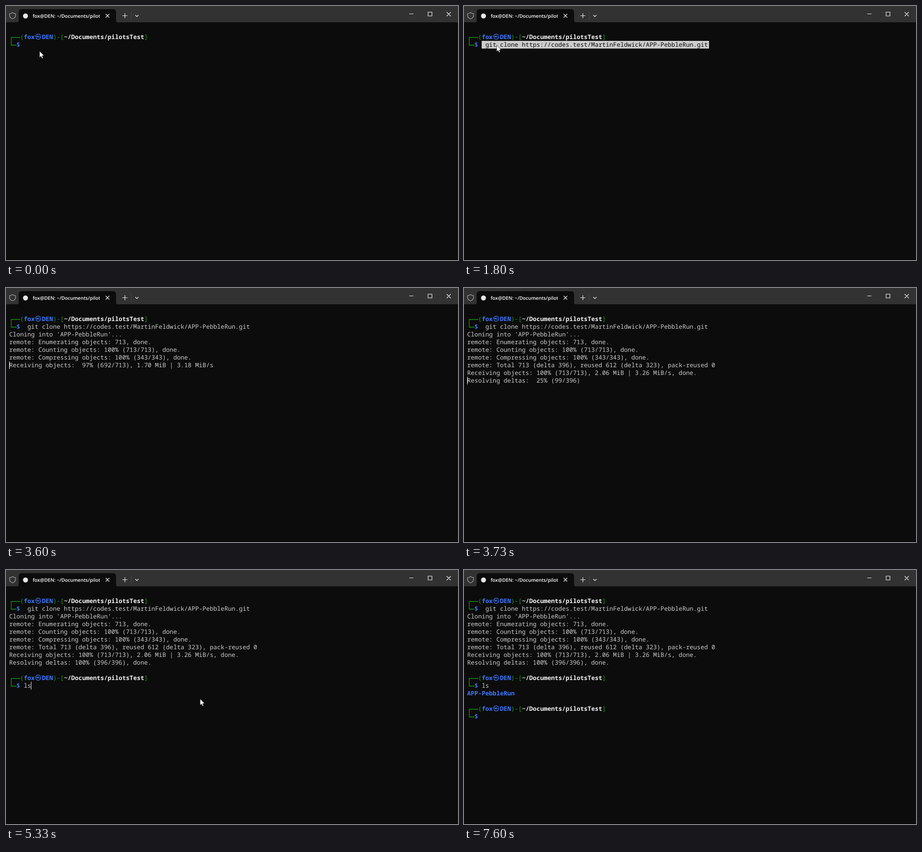
An HTML page for the animation above (7.74 s loop, 998 px wide and 561 px high).

```html
<!DOCTYPE html>
<html lang="en">
<head>
<meta charset="utf-8">
<title>Terminal</title>
<style>
  html, body { margin: 0; width: 100%; height: 100%; overflow: hidden; background: #0c0c0c; }
  svg { display: block; }
  text { white-space: pre; text-rendering: geometricPrecision; }
  #screen text { font: 500 13.43px "Noto Sans Mono", "DejaVu Sans Mono", monospace; fill: #ccc; }
  #screen .green { fill: #13a10e; }
  #screen .blue { fill: #3b78ff; font-weight: 600; }
  #screen .mark { fill: #3b78ff; font: 13.6px "Noto Sans CJK KR", "Noto Sans CJK JP", "Noto Sans CJK", sans-serif; }
  #screen .white { fill: #f2f2f2; font-weight: 600; }
  #screen .dark { fill: #0c0c0c; }
  .box { fill: none; stroke: #13a10e; stroke-width: 1.3; }
  .title { font: 600 10.6px "Open Sans", "Noto Sans", sans-serif; fill: #fff; }
  .icon { fill: none; stroke: #fff; stroke-width: 1.1; }
</style>
</head>
<body>
<svg width="998" height="561" viewBox="0 0 998 561">
  <clipPath id="titleClip"><rect x="55" y="8" width="152" height="28"/></clipPath>
  <rect width="998" height="561" fill="#0c0c0c"/>
  <rect width="998" height="36" fill="#323232"/>
  <path d="M24 36q4 0 4-4V14q0-7 7-7H236q7 0 7 7V32q0 4 4 4z" fill="#0c0c0c"/>
  <path class="icon" style="stroke:#b4b4b4" d="M14.5 14.5Q17.500 16.800 21 16.800V21Q21 26 14.500 28.500Q8 26 8 21V16.800Q11.500 16.800 14.500 14.500z"/>
  <circle cx="43" cy="22" r="5.500" fill="#e6e6e6"/>
  <text class="title" x="59" y="26" clip-path="url(#titleClip)">fox@DEN: ~/Documents/pilotsTest</text>
  <path class="icon" d="M220 17.500l8 8m0-8l-8 8M262.500 16v11M257 21.500h11M285.500 20l3.500 3.500 3.500-3.500"/>
  <path d="M276.500 12v19" stroke="#454545"/>
  <path class="icon" d="M890.500 17.500h9M932 13.500h8.500v8.500h-8.500zM973 13.500l9 9m0-9l-9 9"/>
  <rect y="560" width="998" height="1" fill="#000"/>
  <g id="screen"></g>
  <rect id="caret" width="1" height="17" fill="#fff"/>
  <path id="pointer" d="M0 0V14.500L3.300 11.400 5.400 16.400 7.900 15.300 5.800 10.500H10.300z" fill="#fff" stroke="#000" stroke-width=".8"/>
</svg>
<script>
const LOOP = 7740, CELL = 8.06, ROW = 17, LEFT = 7, TOP = 60;
const screen = document.getElementById("screen");
const colX = col => LEFT + col * CELL;
const rowY = row => TOP + row * ROW;

function add(parent, tag, attrs, content = "") {
  const el = document.createElementNS("http://www.w3.org/2000/svg", tag);
  for (const key in attrs) el.setAttribute(key, attrs[key]);
  el.textContent = content;
  return parent.appendChild(el);
}

function play(el, frames) {
  el.animate(frames.map(f => ({ ...f, easing: "step-end" })), { duration: LOOP, iterations: Infinity });
}

function show(el, from, to = LOOP) {
  if (from === 0 && to === LOOP) return;
  play(el, [
    { offset: 0, opacity: 0 },
    { offset: from / LOOP, opacity: 1 },
    { offset: to / LOOP, opacity: 0 },
    { offset: 1, opacity: 0 }
  ]);
}

// Steps are [time, x, y]; a step without a position hides the element.
function track(el, steps) {
  const frames = steps.map(([time, x, y]) => ({
    offset: time / LOOP,
    opacity: x === undefined ? 0 : 1,
    transform: `translate(${x ?? 0}px, ${y ?? 0}px)`
  }));
  play(el, [...frames, { ...frames.at(-1), offset: 1 }]);
}

const print = (parent, row, col, text, style = "") =>
  add(parent, "text", { x: colX(col), y: rowY(row) + 13, class: style }, text);

function line(from, to, row, text, col = 0, style) {
  show(print(screen, row, col, text, style), from, to);
}

function prompt(from, row) {
  const group = add(screen, "g", {});
  const y = rowY(row) + 9.5;
  add(group, "path", { class: "box", d: `M31.500 ${y}H11.500V${y + ROW}H23` });
  print(group, row, 3, "(", "green");
  print(group, row, 4, "fox", "blue");
  print(group, row, 7.100, "㉿", "mark");
  print(group, row, 9, "DEN", "blue");
  print(group, row, 12, ")-[", "green");
  print(group, row, 15, "~/Documents/pilotsTest", "white");
  print(group, row, 37, "]", "green");
  print(group, row + 1, 2, "$", "blue");
  show(group, from);
}

const project = "APP-PebbleRun";
const command = ` git clone https://codes.test/MartinFeldwick/${project}.git`;

prompt(0, 0);
const pasted = add(screen, "g", {});
add(pasted, "rect", { x: 39, y: rowY(1), width: 502, height: ROW, fill: "#ccc" });
print(pasted, 1, 4, command, "dark");
show(pasted, 1800, 2470);

line(2470, LOOP, 1, command, 4);
line(2470, LOOP, 2, `Cloning into '${project}'...`);
line(3000, LOOP, 3, "remote: Enumerating objects: 713, done.");
line(3000, LOOP, 4, "remote: Counting objects: 100% (713/713), done.");
line(3000, 3070, 5, "remote: Compressing objects:  62% (213/343)");
line(3070, LOOP, 5, "remote: Compressing objects: 100% (343/343), done.");
line(3600, 3670, 6, "Receiving objects:  97% (692/713), 1.70 MiB | 3.18 MiB/s");
line(3670, LOOP, 6, "remote: Total 713 (delta 396), reused 612 (delta 323), pack-reused 0");
line(3670, LOOP, 7, "Receiving objects: 100% (713/713), 2.06 MiB | 3.26 MiB/s, done.");

const resolveTimes = [3670, 3730, 3800, 3870, 3930];
for (let i = 0; i < 4; i++) {
  const count = i * 99;
  const percent = String(i * 25).padStart(3);
  line(resolveTimes[i], resolveTimes[i + 1], 8, `Resolving deltas: ${percent}% (${count}/396)`);
}
line(3930, LOOP, 8, "Resolving deltas: 100% (396/396), done.");

prompt(3930, 10);
line(5070, LOOP, 11, "l", 4);
line(5200, LOOP, 11, "s", 5);
line(5670, LOOP, 12, project, 0, "blue");
prompt(5670, 14);

const caretSteps = [
  [0], [530, 4, 1], [1800], [2470, 0, 3], [3000, 0, 5], [3070, 0, 6], [3670, 0, 8],
  [3930, 4, 11], [5070, 5, 11], [5200, 6, 11], [5600, 0, 12], [5670, 4, 15], [7600]
];
track(document.getElementById("caret"), caretSteps.map(([time, col, row]) =>
  col === undefined ? [time] : [time, Math.round(colX(col)), rowY(row)]));

// The pointer finally sweeps down and left, out of the window.
const exit = [6400, 6470, 6530, 6600, 6670, 6730, 6800].map((time, i) => {
  const k = i / 6;
  return [time, 413 - 320 * Math.sin(k * Math.PI / 2), 271 + 282 * k * k];
});
track(document.getElementById("pointer"), [
  [0, 74, 99.500], [70, 74, 99], [130, 74, 98.500],
  [330, 73.500, 95], [400, 73, 91], [530, 72, 88], [600, 72, 86.500], [2470],
  [4000, 404, 262], [4070, 416, 272], [4130, 424, 280], [4200, 428.500, 284.500],
  [5070], [5330, 428.500, 284.500], [5600], [6200, 415.500, 273.500],
  ...exit, [6870]
]);
</script>
</body>
</html>
```
